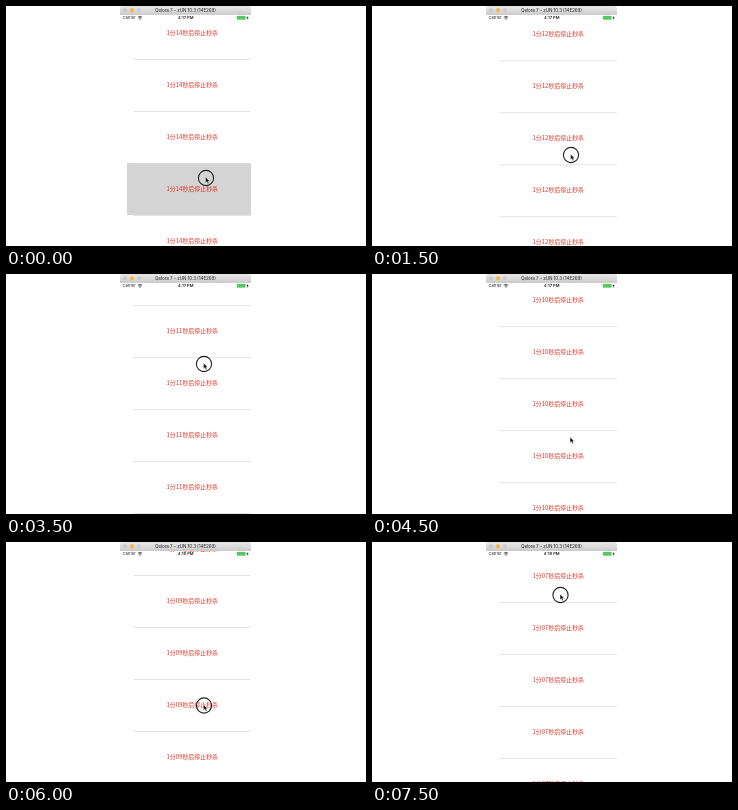
An HTML page for the animation above (8 s loop, 360x240 px).

```html
<!DOCTYPE html>
<html lang="zh">
<head>
<meta charset="utf-8">
<style>
  html, body { margin: 0; width: 360px; height: 240px; overflow: hidden; background: #fff; }
  svg { display: block; }
  text { font-family: Inter, "Liberation Sans", sans-serif; fill: #222; }
  #list text { font: 5.94px "Noto Sans CJK SC", "Noto Sans CJK", sans-serif; fill: #e02f25; }
</style>
</head>
<body>
<svg width="360" height="240" viewBox="0 0 360 240">
  <defs>
    <linearGradient id="bar" x2="0" y2="1">
      <stop stop-color="#e8e8e8"/><stop offset="1" stop-color="#cfcfcf"/>
    </linearGradient>
    <clipPath id="screen"><path d="M114 8.5h131V240H114z"/></clipPath>
  </defs>
  <g clip-path="url(#screen)"><g id="list"></g></g>

  <!-- window title -->
  <path d="M114 8.5V2q0-2 2-2H243q2 0 2 2V8.5z" fill="url(#bar)"/>
  <path d="M114 8.2h131" stroke="#b4b4b4" stroke-width=".6"/>
  <circle cx="119" cy="4.3" r="2" fill="#cbc8c6"/>
  <circle cx="126" cy="4.3" r="2.1" fill="#f6b73c"/>
  <circle cx="133" cy="4.3" r="2" fill="#cbcbcb"/>
  <text x="179.5" y="6" font-size="4.6" text-anchor="middle" textLength="61">Qelora 7 – zUN 10.3 (14E269)</text>

  <!-- status bar -->
  <text x="116.4" y="13.4" font-size="4.1">Carrier</text>
  <g fill="none" stroke="#222" stroke-width=".7">
    <path d="M131.8 11.2q2.2-1.9 4.4 0M132.6 12.2q1.4-1.2 2.8 0"/>
  </g>
  <circle cx="134" cy="13.1" r=".6" fill="#222"/>
  <text id="clock" x="179.7" y="13.4" font-size="4.1" font-weight="600" text-anchor="middle"></text>
  <rect x="231" y="10.1" width="8.4" height="3.5" rx=".7" fill="#4cd058" stroke="#6a9a70" stroke-width=".3"/>
  <path d="M242.2 9.9l-1.8 2.2h1l-.5 1.8 1.9-2.4h-1z" fill="#222"/>

  <g id="cursor">
    <circle id="ring" r="7.6" fill="none" stroke="#222" stroke-width="1.1"/>
    <path d="M-.4-.8v5.6l1.3-1.2 1 2.2 1-.5-1-2.1h1.8z" fill="#111" stroke="#fff" stroke-width=".3"/>
  </g>
</svg>
<script>
const $ = id => document.getElementById(id);
const ROW = 52, STEP = 500, LOOP = 8000;

// One pose per step: scroll, pointer x, pointer y, pressed, seconds left
const poses = [
  [0, 200, 172, 1, 74], [0, 200, 170, 1, 73], [0, 199, 161, 1, 73], [1.2, 199, 149, 1, 72],
  [-44.4, 198, 103, 1, 72], [-44, 198, 47, 0, 72], [-4, 198, 56, 1, 71], [30, 198, 90, 1, 71],
  [72, 198, 132, 1, 70], [103.2, 198.5, 164, 0, 70], [128, 198, 164, 0, 69], [135.6, 198, 164, 0, 69],
  [136, 198, 163.5, 1, 69], [126, 196, 125, 1, 68], [98, 192, 92, 1, 68], [59, 188.5, 53, 1, 67]
];

let rows = '<rect id="pick" x="121" y="157" width="124" height="52" fill="#d3d4d3"/>';
for (let i = -1; i < 5; i++) {
  rows += `<path d="M127 ${53.5 + i * ROW}h118" stroke="#dedede" stroke-width=".8"/>
    <text x="186.3" y="${29.2 + i * ROW}" text-anchor="middle"></text>`;
}
$('list').innerHTML = rows;
const labels = document.querySelectorAll('#list text');

function draw(now) {
  const step = Math.floor(now % LOOP / STEP);
  const [scroll, x, y, pressed, left] = poses[step];
  const seconds = String(left % 60).padStart(2, '0');
  labels.forEach(label => label.textContent = `1分${seconds}秒后停止秒杀`);
  $('list').setAttribute('transform', `translate(0 ${(scroll + 2 * ROW) % ROW})`);
  $('cursor').setAttribute('transform', `translate(${x} ${y})`);
  $('ring').style.display = pressed ? '' : 'none';
  $('pick').style.display = step ? 'none' : '';
  $('clock').textContent = step < 11 ? '4:17 PM' : '4:18 PM';
}

const start = performance.now();
function tick() {
  draw(performance.now() - start);
  requestAnimationFrame(tick);
}
tick();
</script>
</body>
</html>
```
